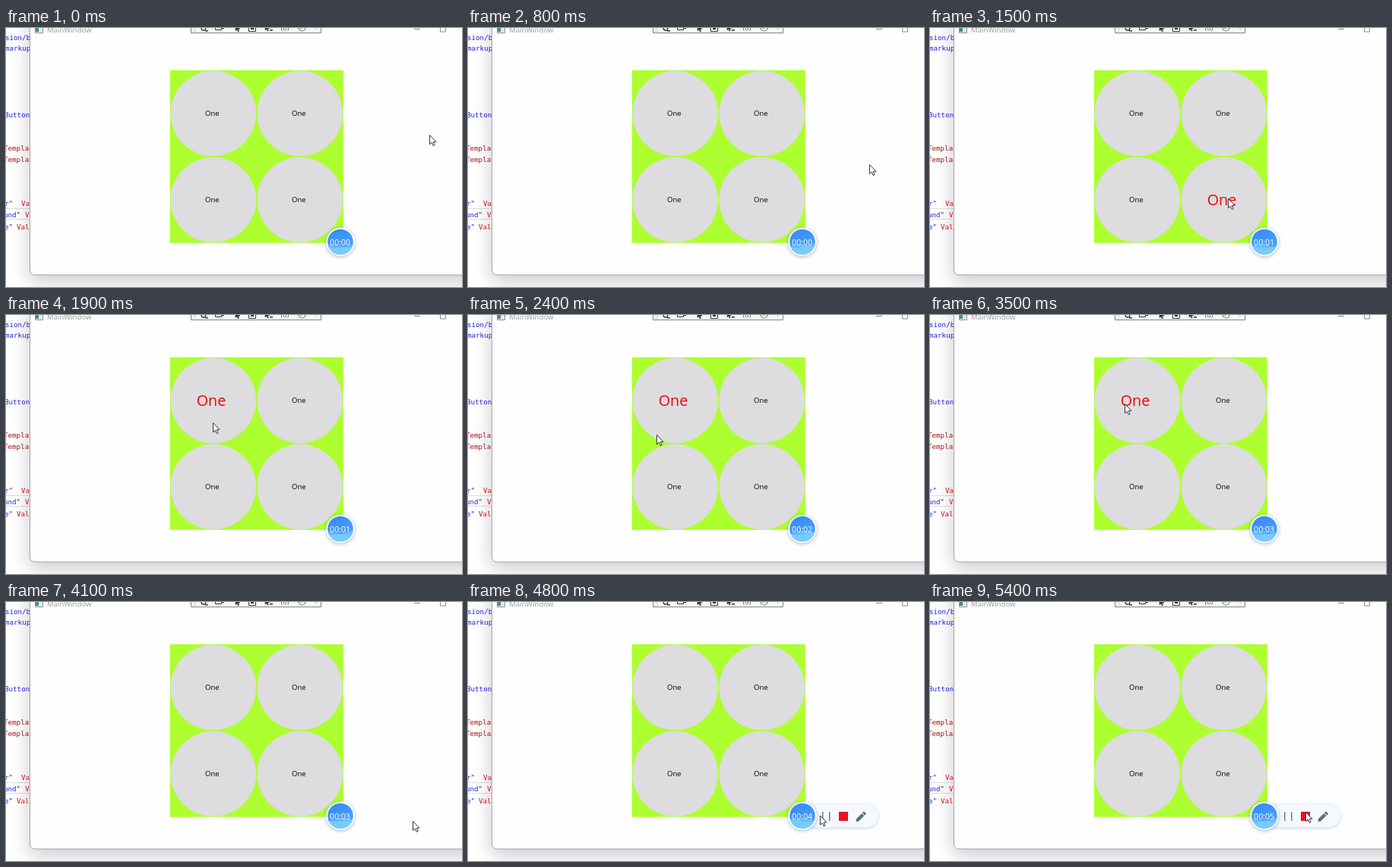
Animation, 600 px wide and 342 px high, one loop 5.5 s. Source, as an HTML page with a canvas:

```html
<!DOCTYPE html>
<html lang="en">
<head>
<meta charset="utf-8">
<title>Round buttons</title>
<style>
html, body { margin: 0; width: 100%; height: 100%; overflow: hidden; background: #fff; }
canvas { display: block; width: 600px; height: 342px; }
</style>
</head>
<body>
<canvas id="stage" width="600" height="342"></canvas>
<script>
const ctx = document.getElementById('stage').getContext('2d');
const LOOP = 5500, STEP = 100;
const CELL = 114, RADIUS = 56.3;
const SANS = '"Open Sans", "Noto Sans", sans-serif';
const MONO = '"DejaVu Sans Mono", "Liberation Mono", monospace';
const BLUE = '#2020dd', BROWN = '#a31515', RED = '#e01818', INK = '#333';

// pointer stops: time, x, y
const STOPS = [
  [100, 557, 141], [600, 528, 180], [800, 528, 180], [1500, 392, 225],
  [1900, 272, 142], [2400, 248, 158], [2900, 282, 95], [3500, 256, 117],
  [3900, 587, 293], [4100, 535, 289], [4600, 446, 284], [5100, 494, 277]
];

const clamp = v => Math.max(0, Math.min(1, v));
const ease = v => v * v * (3 - 2 * v);
const mix = (a, b, k) => a + (b - a) * k;

function fillRect(color, x, y, w, h) {
  ctx.fillStyle = color;
  ctx.fillRect(x, y, w, h);
}

function shape(build, fill, stroke, width = 1) {
  ctx.beginPath();
  build();
  if (fill) { ctx.fillStyle = fill; ctx.fill(); }
  if (stroke) { ctx.strokeStyle = stroke; ctx.lineWidth = width; ctx.stroke(); }
}

const disc = (x, y, r, fill, stroke, width) =>
  shape(() => ctx.arc(x, y, r, 0, Math.PI * 2), fill, stroke, width);

const box = (x, y, w, h, fill, stroke) =>
  shape(() => ctx.rect(x, y, w, h), fill, stroke);

function label(text, x, y, size, color, align = 'left', family = SANS) {
  ctx.font = size + 'px ' + family;
  ctx.textAlign = align;
  ctx.fillStyle = color;
  ctx.fillText(text, x, y);
}

function scoped(draw) {
  ctx.save();
  draw();
  ctx.restore();
}

function withShadow(color, blur, dy, draw) {
  scoped(() => {
    ctx.shadowColor = color;
    ctx.shadowBlur = blur;
    ctx.shadowOffsetY = dy;
    draw();
  });
}

function drawArrow(x, y, scale, fill, stroke) {
  scoped(() => {
    ctx.translate(x, y);
    ctx.scale(scale, scale);
    shape(() => {
      ctx.moveTo(0, 0);
      ctx.lineTo(0, 12.2);
      ctx.lineTo(2.8, 9.7);
      ctx.lineTo(4.7, 14);
      ctx.lineTo(6.6, 13.2);
      ctx.lineTo(4.8, 9);
      ctx.lineTo(8.4, 8.8);
      ctx.closePath();
    }, fill, stroke, 0.9);
  });
}

function drawEditor() {
  fillRect('#fff', 0, 0, 600, 342);
  fillRect('#dcdce4', 0, 238, 32, 1);
  fillRect('#dcdce4', 0, 252, 32, 1);
  const code = (text, x, y, color) => label(text, x, y, 9.2, color, 'left', MONO);
  code('sion/b', -1, 16, BLUE);
  code('markup', -1, 30, BLUE);
  code('Button', -2, 118, BLUE);
  code('Templa', -3, 162, BROWN);
  code('Templa', -3, 177, BROWN);
  code('r"', -2, 235, BLUE);
  code('Va', 20, 235, RED);
  code('und"', -3, 250, BLUE);
  code('V', 25, 250, RED);
  code('e"', -2, 266, BLUE);
  code('Val', 14, 266, RED);
}

function drawWindow() {
  const frame = () => ctx.roundRect(31.5, -20, 600, 346, 6);
  withShadow('rgba(20,10,25,.23)', 26, 8, () => shape(frame, '#fefefe'));
  shape(frame, '#fefefe', '#a5a5a5');

  box(38.5, -4.5, 10, 11, '#e4e8ea', '#8b9499');
  fillRect('#4b8a78', 39, 0, 4, 5);
  label('MainWindow', 54, 5.7, 9.6, '#999');
  fillRect('#8a8a8a', 537, 1, 8, 1);
  box(571.5, -3.5, 7, 8.5, null, '#8a8a8a');
}

function drawDebugBar() {
  box(243.5, -6, 171, 12.5, '#f8f8f8', '#828282');
  for (let i = 0; i < 3; i++) fillRect('#999', 247 + (i % 2) * 2, i * 2, 1, 1);
  disc(260, 0, 3, null, INK, 1.3);
  fillRect(INK, 262, 3, 4, 1.5);
  box(275.5, -3, 8, 5.5, null, INK);
  fillRect(INK, 284, -1, 3, 2);
  drawArrow(302, -5, 0.7, INK, INK);
  box(319.5, -4, 9, 8.5, null, INK);
  fillRect(INK, 322, 0, 4, 2);
  drawArrow(341, -5, 0.65, INK, INK);
  fillRect(INK, 347, 2, 4, 1.5);
  label('(o)', 367, 3, 9, '#555', 'center');
  disc(389.5, -0.5, 4.5, '#f8f8f8', '#42a447', 1.2);
  label('✓', 389.5, 2, 7, '#42a447', 'center');
  label('‹', 408, 3, 9, '#aaa', 'center');
}

function pointerAt(t) {
  const next = STOPS.findIndex(stop => stop[0] > t);
  if (next < 1) return (next ? STOPS[STOPS.length - 1] : STOPS[0]).slice(1);
  const [t0, x0, y0] = STOPS[next - 1], [t1, x1, y1] = STOPS[next];
  const k = ease((t - t0) / (t1 - t0));
  return [mix(x0, x1, k), mix(y0, y1, k)];
}

// Replays the pointer so each label grows under it and shrinks after it leaves.
function hoverState(cx, cy, t) {
  let grow = 0, hot = false;
  for (let s = 0; s <= t; s += STEP) {
    const [x, y] = pointerAt(s);
    hot = Math.hypot(x - cx, y - cy) < RADIUS;
    grow = clamp(grow + (hot ? 0.5 : -0.4));
  }
  return { grow, hot };
}

function drawButtons(t) {
  fillRect('#adff2f', 215.8, 55.8, CELL * 2, CELL * 2);
  for (let i = 0; i < 4; i++) {
    const x = 272.8 + CELL * (i % 2), y = 112.9 + CELL * Math.floor(i / 2);
    const { grow, hot } = hoverState(x, y, t);
    const size = mix(9.5, 19.7, grow);
    disc(x, y, RADIUS, '#dddcde');
    label('One', x - 1.4 - 1.4 * grow, y + size * 0.36, size, hot ? '#ec0505' : '#000', 'center');
  }
}

function drawRecorderMenu(open) {
  if (open <= 0) return;
  const pill = () => ctx.roundRect(440, 267.5, 20 + 80 * open, 30, 15);
  withShadow('rgba(70,110,150,.3)', 4, 1, () => shape(pill, '#f5f9fd'));
  scoped(() => {
    ctx.beginPath();
    pill();
    ctx.clip();
    fillRect('#747b82', 466, 277, 1.5, 12);
    fillRect('#747b82', 475, 277, 1.5, 12);
    fillRect('#e81123', 488, 277, 12, 12);
    ctx.translate(510.5, 290);
    ctx.rotate(-Math.PI / 4);
    shape(() => {
      ctx.moveTo(0, 0);
      ctx.lineTo(3, -2.2);
      ctx.lineTo(13, -2.2);
      ctx.lineTo(13, 2.2);
      ctx.lineTo(3, 2.2);
    }, '#646b72');
    fillRect('#646b72', 14, -2.2, 3, 4.4);
  });
}

function drawTimer(t) {
  const x = 440, y = 282.5;
  withShadow('rgba(60,90,130,.45)', 5, 1, () => disc(x, y, 18.8, '#fff'));
  const sky = ctx.createLinearGradient(x - 10, y - 16, x + 8, y + 16);
  sky.addColorStop(0, '#358bf5');
  sky.addColorStop(1, '#4ea5fb');
  disc(x, y, 16.8, sky);

  scoped(() => {
    ctx.beginPath();
    ctx.arc(x, y, 16.8, 0, Math.PI * 2);
    ctx.clip();
    for (const phase of [0, 2.2]) {
      shape(() => {
        ctx.moveTo(x - 18, y + 18);
        for (let dx = -18; dx <= 18; dx++) {
          ctx.lineTo(x + dx, y + 5.5 + 2.2 * Math.sin(dx / 9 + phase + t / 280));
        }
        ctx.lineTo(x + 18, y + 18);
      }, 'rgba(135,218,255,.5)');
    }
  });

  const seconds = Math.max(0, Math.floor((t - 300) / 1000));
  label('00:0' + seconds, x - 0.4, 286.6, 10.6, '#fff', 'center');
}

function draw(now) {
  const t = Math.floor((now % LOOP) / STEP) * STEP;
  const [px, py] = pointerAt(t);
  drawEditor();
  drawWindow();
  drawDebugBar();
  drawButtons(t);
  drawRecorderMenu(ease(clamp((t - 4450) / 300)));
  drawTimer(t);
  drawArrow(px + 0.5, py + 0.5, 1, '#fff', '#222');
}

const start = performance.now();
function tick() {
  draw(performance.now() - start);
  requestAnimationFrame(tick);
}
tick();
</script>
</body>
</html>
```
